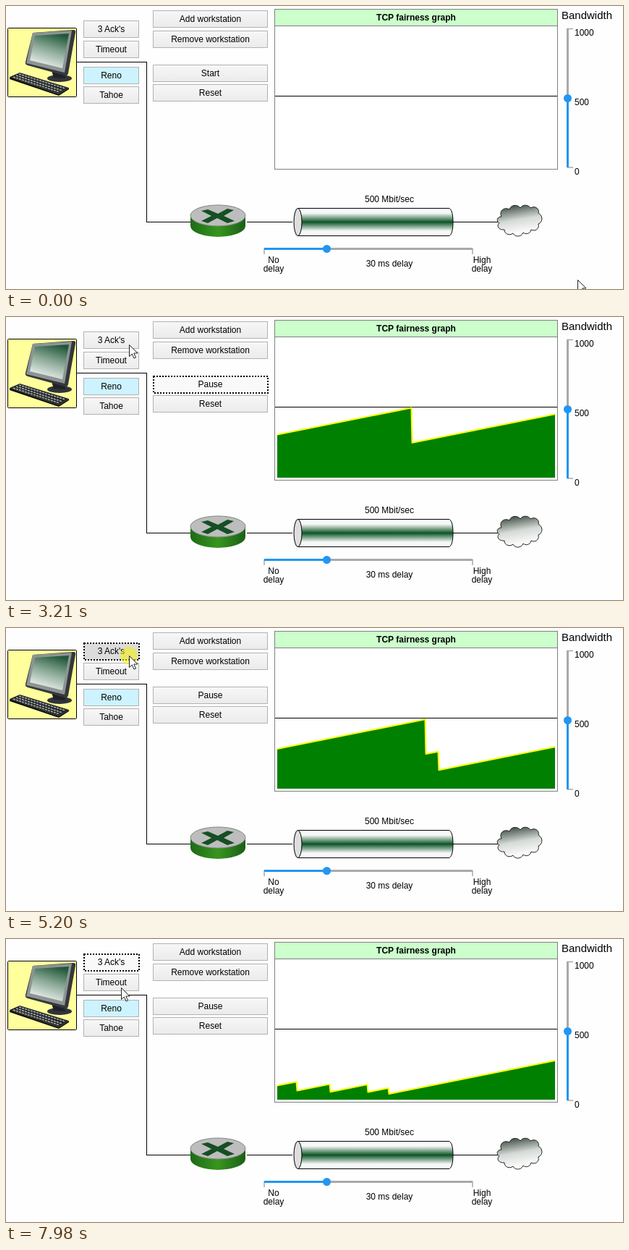
Animation, 853 px wide and 391 px high, one loop 8 s. Source, as an HTML page:

```html
<!DOCTYPE html>
<html lang="en">
<head>
<meta charset="utf-8">
<title>TCP fairness graph</title>
<style>
  html, body { margin: 0; width: 100%; height: 100%; overflow: hidden; background: #fefefe; }
  svg { display: block; width: 100vw; height: 100vh; }
  text { font: 12px "Liberation Sans", Arial, sans-serif; fill: #000; }
  .mid { text-anchor: middle; }
  .wire { fill: none; stroke: #000; shape-rendering: crispEdges; }
  .btn rect { fill: url(#face); stroke: #b2b2b2; shape-rendering: crispEdges; }
  .btn.chosen rect { fill: #ccf3ff; }
  .btn.focus rect { stroke: #000; stroke-width: 2; stroke-dasharray: 2 2; fill: #f9f9f9; }
  .btn.down rect { fill: #dcdcdc; }
</style>
</head>
<body>
<svg viewBox="0 0 853 391">
  <defs>
    <linearGradient id="face" x2="0" y2="1">
      <stop stop-color="#f7f7f7"/><stop offset="1" stop-color="#ebebeb"/>
    </linearGradient>
    <linearGradient id="tube" x2="0" y2="1">
      <stop stop-color="#fff"/><stop offset=".18" stop-color="#f3f6f4"/>
      <stop offset=".5" stop-color="#0d5527"/>
      <stop offset=".82" stop-color="#f3f6f4"/><stop offset="1" stop-color="#fff"/>
    </linearGradient>
    <linearGradient id="mist" x2=".25" y2="1">
      <stop stop-color="#26382c"/><stop offset=".55" stop-color="#d5dad6"/><stop offset="1" stop-color="#fff"/>
    </linearGradient>
    <linearGradient id="glass" x1=".7" y1="0" x2=".35" y2="1">
      <stop stop-color="#1f5738"/><stop offset=".45" stop-color="#86a592"/><stop offset="1" stop-color="#f2f5f3"/>
    </linearGradient>
    <linearGradient id="drum">
      <stop stop-color="#1d6b17"/><stop offset=".5" stop-color="#38951f"/><stop offset="1" stop-color="#1b5f16"/>
    </linearGradient>
    <clipPath id="plot"><rect x="375" y="28" width="384" height="195"/></clipPath>
  </defs>

  <path class="wire" d="M98 77.5H194.5V298.5H256M333 298.5H396M618 298.5H680"/>

  <!-- workstation -->
  <rect x="2.5" y="30.5" width="95" height="95" rx="1" fill="#ffff9c" stroke="#000"/>
  <ellipse cx="74" cy="100" rx="17" ry="5" fill="#30343a"/>
  <path d="M62 86L80 90L82 100L66 99Z" fill="#1f2226"/>
  <path d="M37 37L93 33Q97 33 96 37L86 93Q85 97 81 96L30 82Q26 81 27 77Z" fill="#34383b"/>
  <path d="M37 37L91 34L81 92L28 79Z" fill="#8d9493"/>
  <path d="M40 41L87 38L78 86L33 75Z" fill="url(#glass)"/>
  <path d="M5 98L19 92L87 113L73 122Z" fill="#25282b"/>
  <path d="M5 98L73 122V124L5 101ZM73 122L87 113V115L73 124Z" fill="#0c0d0e"/>
  <path d="M10 98L74 119M14 96L78 117M18 94L82 114" stroke="#a9afab" stroke-width="1.6" stroke-dasharray="3 1.2"/>

  <!-- router -->
  <path d="M255 289V304A38 15 0 0 0 331 304V289Z" fill="url(#drum)"/>
  <ellipse cx="293" cy="289.5" rx="38" ry="14.5" fill="#bdbdbd" stroke="#818781"/>
  <path d="M270 283L279 281L293 287L306 280L315 282L301 290L316 297L306 300L292 293L279 300L270 297L284 290Z" fill="#164f23"/>

  <!-- link -->
  <path d="M403 279.5H612C616 279.5 618 288 618 298.500S616 317.500 612 317.500H403Z" fill="url(#tube)" stroke="#000"/>
  <ellipse cx="403.500" cy="298.500" rx="5.500" ry="19" fill="#dedede" stroke="#000"/>

  <!-- cloud -->
  <path d="M685 291C681 283 689 277 696 281C698 274 708 274 711 279C715 273 723 275 725 279C732 275 738 281 736 286C743 290 742 299 736 301C738 308 731 312 726 309C725 315 718 316 715 313C712 320 703 319 701 314C696 318 689 315 689 309C682 310 677 304 682 300C677 297 679 291 685 291Z" fill="url(#mist)" stroke="#222"/>

  <!-- graph -->
  <rect x="371.5" y="4.5" width="391" height="221" fill="#fff" stroke="#808080" shape-rendering="crispEdges"/>
  <path d="M372 5H762V27H372Z" fill="#cfc"/>
  <path class="wire" d="M372 27.5H762" style="stroke:#808080"/>
  <path class="wire" d="M372 124.5H762"/>
  <text class="mid" x="567" y="20" style="font-weight:bold">TCP fairness graph</text>
  <g clip-path="url(#plot)">
    <path id="area" fill="green"/>
    <path id="trace" fill="none" stroke="#ff0" stroke-width="2" stroke-linejoin="round"/>
  </g>

  <!-- sliders -->
  <g fill="none" stroke="#a9a9a9" stroke-width="3">
    <path d="M776.5 31V128M357 335.500H645"/>
    <path d="M776 31.500H784M776 223H784M357 335V343M645 335V343" stroke-width="1.500"/>
    <path d="M776.5 128V223M357 335.500H443" stroke="#2196f3"/>
  </g>
  <g fill="#2196f3"><circle cx="776.5" cy="127.500" r="5.500"/><circle cx="443.500" cy="335.500" r="5.500"/></g>
  <text x="768" y="18" style="font-size:15px">Bandwidth</text>
  <text x="786" y="41">1000</text>
  <text x="786" y="137">500</text>
  <text x="786" y="233">0</text>
  <text class="mid" x="530" y="271">500 Mbit/sec</text>
  <text class="mid" x="530" y="360">30 ms delay</text>
  <text class="mid" x="370" y="355">No</text>
  <text class="mid" x="370" y="367">delay</text>
  <text class="mid" x="658" y="355">High</text>
  <text class="mid" x="658" y="367">delay</text>

  <g id="buttons"></g>

  <g id="pointer">
    <circle id="glow" r="12" fill="#f5f000" opacity=".55"/>
    <path d="M.5 .5V16.500L4.300 13L7 19L9.500 18L6.800 12H12Z" fill="#fff" stroke="#222"/>
  </g>
</svg>
<script>
const LOOP = 8000, PLOT_LEFT = 375, PLOT_WIDTH = 384, PLOT_BASE = 222;
const GROWTH = 0.2, PRESS = 24;
const $ = id => document.getElementById(id);

// Screen refreshes are slightly uneven: [ms, tick].
const TICKS = [[0, 0], [820, 16], [1090, 21], [1650, 32], [2510, 49], [3310, 65], [3940, 77], [4140, 81],
  [4950, 97], [5200, 102], [5270, 103], [5770, 113], [6590, 129], [6760, 132], [7420, 145], [7980, 156]];
// Samples plotted so far: [tick, samples].
const PROGRESS = [[15.4, 0], [21, 67], [49, 410], [77, 732], [102, 1032], [132, 1384], [156, 1666]];
// Pointer: [tick, x, y].
const POINTER = [[0, 790, 378], [3, 700, 330], [6, 480, 218], [9, 290, 118], [12, 236, 93], [15.4, 232, 91],
  [16, 219, 64], [21, 198, 42], [25, 170, 38], [137, 170, 38], [143, 167, 68], [145, 165, 69], [149, 159, 67]];

const FULL_LINK = [372, 612, 852];
const ACK_CLICKS = [870, 1032, 1141, 1193, 1261, 1308, 1354, 1406, 1435];

function lerp(table, at, col = 1) {
  if (at <= table[0][0]) return table[0][col];
  const i = table.findIndex(row => row[0] > at);
  if (i < 0) return table[table.length - 1][col];
  const a = table[i - 1], b = table[i];
  return a[col] + (b[col] - a[col]) * (at - a[0]) / (b[0] - a[0]);
}

// Slow start, then linear growth with the window halved at every loss.
function buildCurve() {
  const curve = [[0, 0], [1.5, 1], [3, 5], [4, 11], [5, 24], [5.5, 49], [6.5, 23.5]];
  let [pos, height] = curve[curve.length - 1];
  for (const loss of [...FULL_LINK, ...ACK_CLICKS]) {
    height += (loss - pos) * GROWTH;
    curve.push([loss, height]);
    pos = loss + 1;
    height /= 2;
    curve.push([pos, height]);
  }
  curve.push([2000, height + (2000 - pos) * GROWTH]);
  return curve;
}
const CURVE = buildCurve();

function addButton(label, x, y, width, state = '') {
  const group = document.createElementNS('http://www.w3.org/2000/svg', 'g');
  group.setAttribute('class', 'btn ' + state);
  group.innerHTML = `<rect x="${x + .5}" y="${y + .5}" width="${width - 1}" height="23"/>` +
    `<text class="mid" x="${x + width / 2}" y="${y + 16}">${label}</text>`;
  $('buttons').append(group);
  return group;
}
const ack = addButton("3 Ack's", 107, 20, 77);
addButton('Timeout', 107, 48, 77);
addButton('Reno', 107, 84, 77, 'chosen');
addButton('Tahoe', 107, 111, 77);
addButton('Add workstation', 203, 6, 159);
addButton('Remove workstation', 203, 34, 159);
const start = addButton('Start', 203, 81, 159);
addButton('Reset', 203, 108, 159);

function drawPlot(head) {
  if (head <= 0) {
    $('area').setAttribute('d', '');
    $('trace').setAttribute('d', '');
    return;
  }
  const shift = PLOT_LEFT + 0.5 - Math.max(0, head - PLOT_WIDTH);
  const points = [...CURVE.filter(p => p[0] < head), [head, lerp(CURVE, head)]];
  const line = 'M' + points.map(([p, h]) => `${(p + shift).toFixed(2)} ${(PLOT_BASE - h).toFixed(2)}`).join('L');
  $('trace').setAttribute('d', line);
  $('area').setAttribute('d', `${line}L${head + shift + .5} ${PLOT_BASE}H${shift}Z`);
}

function render(ms) {
  const tick = Math.floor(lerp(TICKS, ms) + 0.25);
  const head = lerp(PROGRESS, tick);
  const startDown = tick >= 13 && head <= 0;
  const ackDown = ACK_CLICKS.some(c => head >= c - PRESS && head <= c);
  const ackFocus = head >= ACK_CLICKS[0] - PRESS;

  start.classList.toggle('focus', tick >= 13 && !ackFocus);
  start.classList.toggle('down', startDown);
  start.lastChild.textContent = head > 0 ? 'Pause' : 'Start';
  ack.classList.toggle('focus', ackFocus);
  ack.classList.toggle('down', ackDown);

  $('glow').style.display = startDown || ackDown ? '' : 'none';
  $('pointer').setAttribute('transform', `translate(${lerp(POINTER, tick, 1)} ${lerp(POINTER, tick, 2)})`);
  drawPlot(head);
}

const begin = performance.now();
function loop() {
  render((performance.now() - begin) % LOOP);
  requestAnimationFrame(loop);
}
loop();
</script>
</body>
</html>
```
